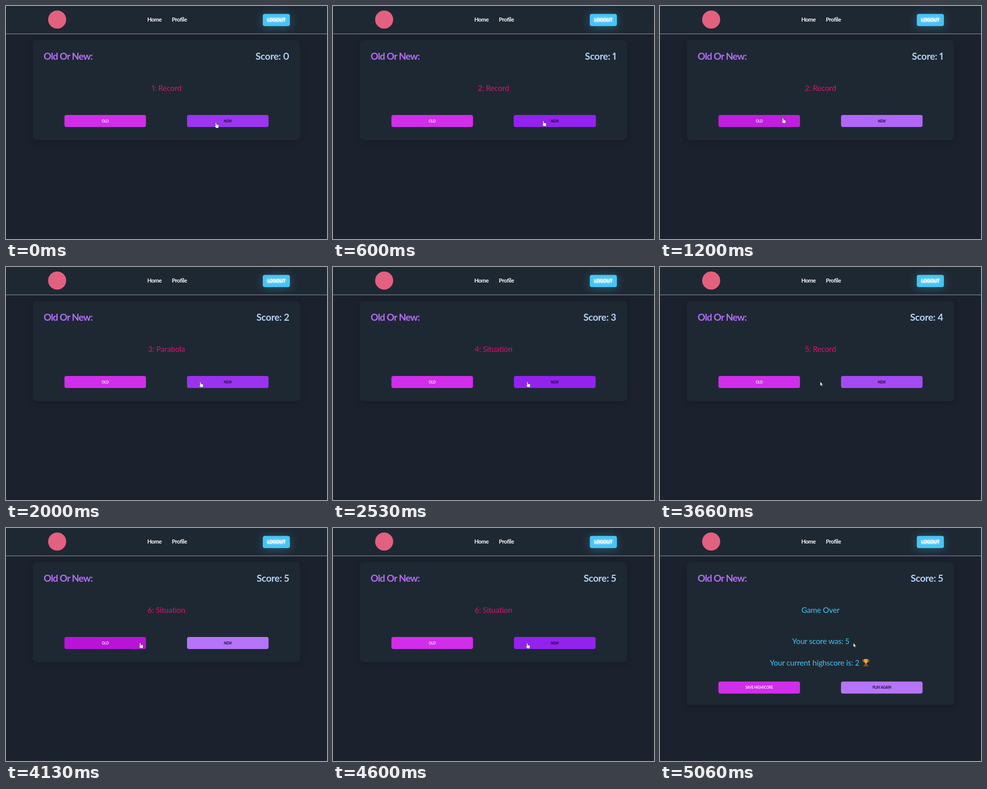
Animation of 640x464 px, one loop 5.8 s. Source, as an HTML page:

```html
<!DOCTYPE html>
<html lang="en">
<head>
<meta charset="utf-8">
<title>Old Or New</title>
<style>
  html, body { margin: 0; width: 100%; height: 100%; overflow: hidden; background: #1b212d; }
  svg { display: block; width: 640px; height: 464px; font-family: Lato, sans-serif; font-variant-numeric: proportional-nums; }
  .heading { font-size: 19px; font-weight: 700; }
  .nav { font-size: 11.2px; font-weight: 700; letter-spacing: -.4px; fill: #fff; }
  .line { font-size: 15.5px; letter-spacing: -.2px; }
  .label { font-size: 6.8px; font-weight: 700; letter-spacing: -.2px; }
  .line, .label, .nav, .logout { text-anchor: middle; }
  .logout { font-size: 9px; font-weight: 700; letter-spacing: -.2px; fill: #fff; text-shadow: 0 0 3px #fff, 0 0 5px #fff; }
  .glow { filter: drop-shadow(0 2px 9px #45c4f555); }
  #card { filter: drop-shadow(0 4px 6px #0002); }
</style>
</head>
<body>
<svg viewBox="0 0 640 464">
  <rect width="640" height="55" fill="#1e2833"/>
  <rect y="55" width="640" height="1" fill="#8f99a3"/>
  <circle cx="102" cy="27" r="18" fill="#e4607f"/>
  <text class="nav" x="296" y="31">Home</text>
  <text class="nav" x="345.8" y="31">Profile</text>
  <rect class="glow" x="512" y="15.7" width="54" height="24.3" rx="4" fill="#45c4f5"/>
  <text class="logout" x="539" y="31">LOGOUT</text>

  <rect id="card" x="53.4" y="68" width="533.2" height="199" rx="8" fill="#1e2833"/>
  <text class="heading" x="75" y="106.5" fill="#b56ef8" letter-spacing="-.8">Old Or New:</text>
  <text class="heading" id="score" x="564.5" y="106.5" fill="#b4d2f6" text-anchor="end" letter-spacing="-.3"></text>
  <text class="line" id="word" x="320" y="168.5"></text>

  <g id="result" fill="#3fc4f7">
    <text class="line" x="320.5" y="231">Your score was: 5</text>
    <text class="line" x="308" y="273.5">Your current highscore is: 2</text>
    <g transform="translate(410.5 261)">
      <path d="M-4 2H-6Q-6 6 -3 6M4 2H6Q6 6 3 6" fill="none" stroke="#e08a1e" stroke-width="1.2"/>
      <path d="M-4 0H4Q4 7 1 8V11H-1V8Q-4 7 -4 0Z" fill="#f7a72b"/>
      <path d="M-3.5 11H3.5L5 14.5H-5Z" fill="#87482d"/>
    </g>
  </g>

  <g id="old">
    <rect x="-81.3" y="-12" width="162.6" height="24" rx="4"/>
    <text class="label" y="2.5" fill="#fbeaff"></text>
  </g>
  <g id="new">
    <rect x="-81.3" y="-12" width="162.6" height="24" rx="4"/>
    <text class="label" y="2.5" fill="#1b0d38"></text>
  </g>

  <g id="cursor" fill="#fff" stroke="#20202c" stroke-width=".5" stroke-linejoin="round">
    <path id="hand" d="M.3 1Q1.4-.5 2.4 1L2.8 4 6 4.8Q7.6 5.2 7.3 7L6.6 11H2.2L-1 7.4Q-1 6 .9 6.8Z"/>
    <path id="arrow" d="M0 0V8L1.8 6.4 3 9 4.3 8.4 3.1 5.9H5.5Z"/>
  </g>
</svg>
<script>
const LOOP = 5800, FADE = 150, GAME_OVER = 4800;

// [start time, score, word]
const rounds = [
  [0, 0, '1: Record'], [420, 1, '2: Record'], [1420, 2, '3: Parabola'],
  [2300, 3, '4: Situation'], [2950, 4, '5: Record'], [3880, 5, '6: Situation'],
  [GAME_OVER, 5, 'Game Over']
];

// [time, x, y] of the pointer tip
const path = [
  [60, 417, 232], [300, 418, 228.5], [1000, 418, 228.5], [1200, 243.5, 222.5],
  [1330, 230, 228], [1640, 230, 228], [1960, 386, 228.5], [3500, 386, 228.5],
  [3800, 266, 228.5], [4200, 266, 228.5], [4500, 385.5, 229], [LOOP, 385.5, 229]
];

const buttons = [
  { id: 'old', x: 197.8, labels: ['OLD', 'SAVE HIGHSCORE'], rest: [208, 46, 234], hover: [184, 20, 216],
    hovered: [[1110, 1758], [3737, 4260]], clicks: [1420, 3880] },
  { id: 'new', x: 442.2, labels: ['NEW', 'PLAY AGAIN'], rest: [182, 116, 248], hover: [147, 34, 238],
    hovered: [[-115, 1075], [1880, 3587], [4404, GAME_OVER]], clicks: [420, 2300, 2950] }
];

const $ = id => document.getElementById(id);
const clamp = v => Math.min(1, Math.max(0, v));
const mix = (a, b, p) => a + (b - a) * p;
const smooth = p => p * p * (3 - 2 * p);
const show = (id, on) => $(id).setAttribute('visibility', on ? 'visible' : 'hidden');

function pointer(t) {
  const i = path.findIndex(key => key[0] > t);
  if (i < 1) return path[0].slice(1);
  const [t0, x0, y0] = path[i - 1], [t1, x1, y1] = path[i];
  const p = smooth((t - t0) / (t1 - t0));
  return [mix(x0, x1, p), mix(y0, y1, p)];
}

function popScale(age) {
  if (age < 0 || age > 250) return 1;
  return age < 100 ? mix(.97, 1.02, age / 100) : mix(1.02, 1, (age - 100) / 150);
}

function drawButton(button, t, over) {
  const level = button.hovered.reduce((sum, [from, to]) =>
    sum + clamp((t - from) / FADE) - clamp((t - to) / FADE), 0);
  const scale = button.clicks.reduce((s, click) => s * popScale(t - click), 1);
  const color = button.rest.map((c, i) => Math.round(mix(c, button.hover[i], level)));
  const group = $(button.id);
  group.setAttribute('transform', `translate(${button.x} ${over ? 317.8 : 229}) scale(${scale})`);
  group.children[0].setAttribute('fill', `rgb(${color})`);
  group.children[1].textContent = button.labels[+over];
}

function draw(t) {
  const [, score, word] = rounds.filter(round => round[0] <= t).pop();
  const over = t >= GAME_OVER;
  $('score').textContent = 'Score: ' + score;
  $('word').textContent = word;
  $('word').setAttribute('fill', over ? '#3fc4f7' : '#d3166f');
  $('card').setAttribute('height', over ? 284 : 199);
  show('result', over);
  buttons.forEach(button => drawButton(button, t, over));

  const [x, y] = pointer(t);
  const onButton = !over && buttons.some(b => Math.abs(x - b.x) < 81.3);
  $('cursor').setAttribute('transform', `translate(${x} ${y})`);
  show('hand', onButton);
  show('arrow', !onButton);
}

const start = performance.now();
function tick() {
  draw((performance.now() - start) % LOOP);
  requestAnimationFrame(tick);
}
tick();
</script>
</body>
</html>
```
